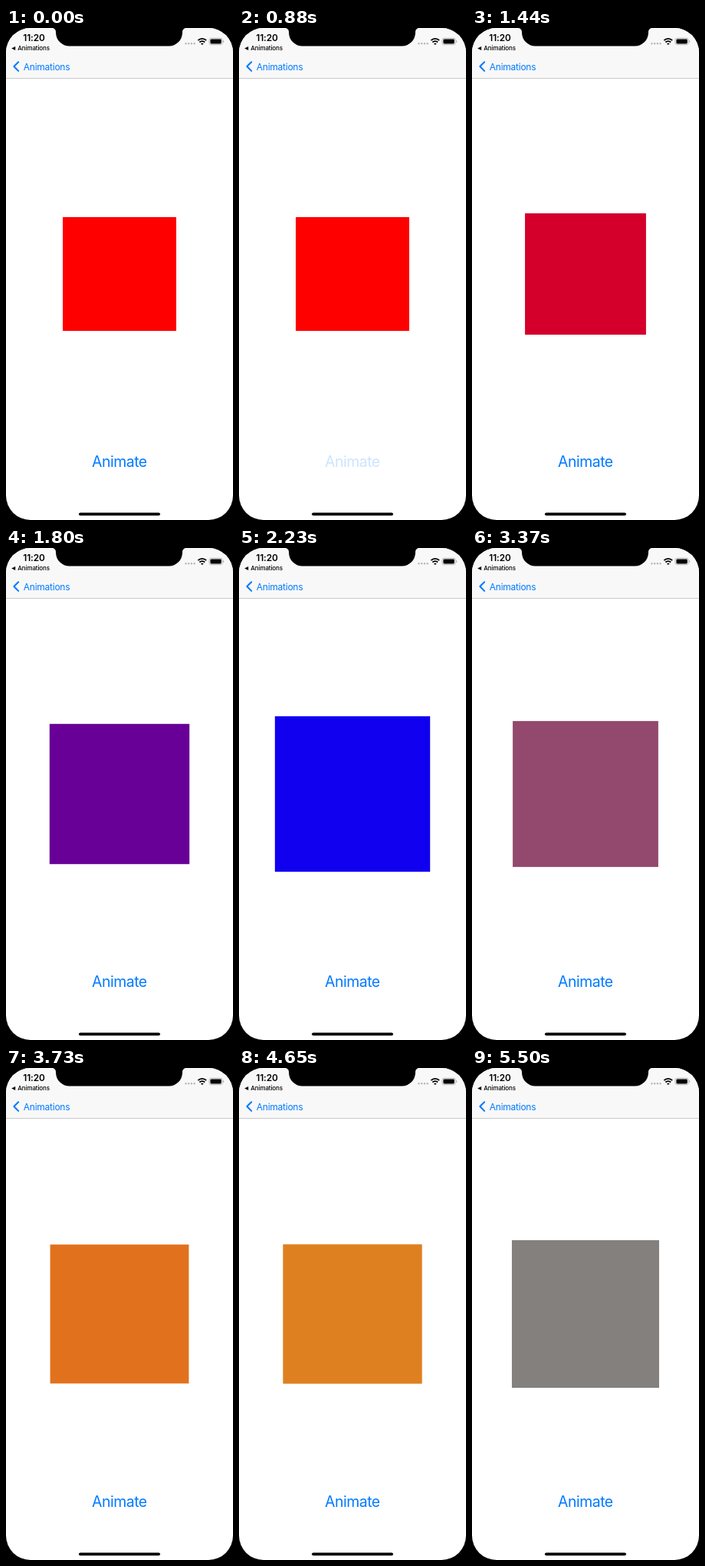
These frames come from a looping animation (296 by 640 pixels, 5660 ms). An HTML page:

```html
<!DOCTYPE html>
<html lang="en">
<head>
<meta charset="utf-8">
<title>Animated square</title>
<style>
  html, body { margin: 0; width: 100%; height: 100%; overflow: hidden; background: #000; }
  svg { display: block; width: 296px; height: 640px; font-family: Inter, "Liberation Sans", sans-serif; }
</style>
</head>
<body>
<svg viewBox="0 0 296 640">
  <clipPath id="screen"><rect width="296" height="640" rx="32"/></clipPath>
  <g clip-path="url(#screen)">
    <rect width="296" height="640" fill="#fff"/>
    <rect width="296" height="65.5" fill="#f8f8f8"/>
    <rect y="65.3" width="296" height=".8" fill="#b8b8b8"/>
    <path d="M60 0a5 5 0 0 1 5 5v1a17.5 17.5 0 0 0 17.5 17.5h130A17.5 17.5 0 0 0 230 6V5a5 5 0 0 1 5-5z"/>

    <text x="22.3" y="17" font-size="11.8" font-weight="600" letter-spacing="-.1">11:20</text>
    <path d="M7.2 26.5l5-2.6v5.2z"/>
    <text x="15.2" y="29.3" font-size="8" font-weight="500" letter-spacing="-.1">Animations</text>

    <path d="M234.5 20.3h12" stroke="#b5b5b5" stroke-width="2.4" stroke-linecap="round" stroke-dasharray="0 3.7"/>
    <g fill="none" stroke="#000" stroke-width="1.9">
      <path d="M250.4 16.1a7.6 7.6 0 0 1 10.8 0M252.4 18.5a4.8 4.8 0 0 1 6.8 0"/>
      <path d="M255.8 19.6l2 1.2-2 .9-2-.9z" stroke="none" fill="#000"/>
    </g>
    <rect x="265" y="13.3" width="17.2" height="8.4" rx="2.4" fill="none" stroke="#a8a8a8" stroke-width=".8"/>
    <rect x="266.4" y="14.6" width="14.4" height="5.8" rx="1.3"/>
    <path d="M283.2 16a1.6 1.6 0 0 1 0 3z" fill="#a8a8a8"/>

    <g fill="#007aff">
      <path d="M16.2 44.2L10.4 50l5.8 5.9" fill="none" stroke="#007aff" stroke-width="2" stroke-linecap="round" stroke-linejoin="round"/>
      <text x="22.8" y="54.5" font-size="12" letter-spacing="-.25">Animations</text>
      <text id="button" x="112" y="570.7" font-size="19.4" letter-spacing="-.45">Animate</text>
    </g>
    <rect id="square"/>
    <rect x="95" y="630.4" width="106" height="3.8" rx="1.9"/>
  </g>
</svg>
<script>
const LOOP = 5660, PRESS = 880, STEP = 71.08;
const START = 925, DURATION = 1585, FADE = 450;
const poses = [
  { size: 148, color: [255, 0, 0] },
  { size: 206, color: [0, 0, 255] },
  { size: 177.6, color: [255, 128, 0] },
  { size: 192.4, color: [128, 128, 128] }
];
const square = document.getElementById('square');
const button = document.getElementById('button');
const clamp = x => Math.min(1, Math.max(0, x));
const mix = (a, b, k) => a + (b - a) * k;

// cubic-bezier(.42, 0, .58, 1), solved by bisection
function easeInOut(x) {
  let low = 0, high = 1;
  for (let i = 0; i < 24; i++) {
    const s = (low + high) / 2, r = 1 - s;
    if (1.26 * s * r * r + 1.74 * s * s * r + s * s * s < x) low = s;
    else high = s;
  }
  return low * low * (3 - 2 * low);
}

function draw(time) {
  const t = time < PRESS ? time : PRESS + Math.floor((time - PRESS) / STEP + .08) * STEP;
  const phase = Math.max(0, (t - START) / DURATION);
  const i = Math.min(2, Math.floor(phase));
  const k = easeInOut(clamp(phase - i));
  const from = poses[i], to = poses[i + 1];

  const size = mix(from.size, to.size, k);
  square.setAttribute('x', 148 - size / 2);
  square.setAttribute('y', 320 - size / 2);
  square.setAttribute('width', size);
  square.setAttribute('height', size);
  square.setAttribute('fill', `rgb(${from.color.map((c, n) => Math.round(mix(c, to.color[n], k)))})`);
  button.setAttribute('opacity', t < PRESS ? 1 : mix(.2, 1, clamp((t - START) / FADE)));
}

const begin = performance.now();
function tick() {
  draw((performance.now() - begin) % LOOP);
  requestAnimationFrame(tick);
}
tick();
</script>
</body>
</html>
```
